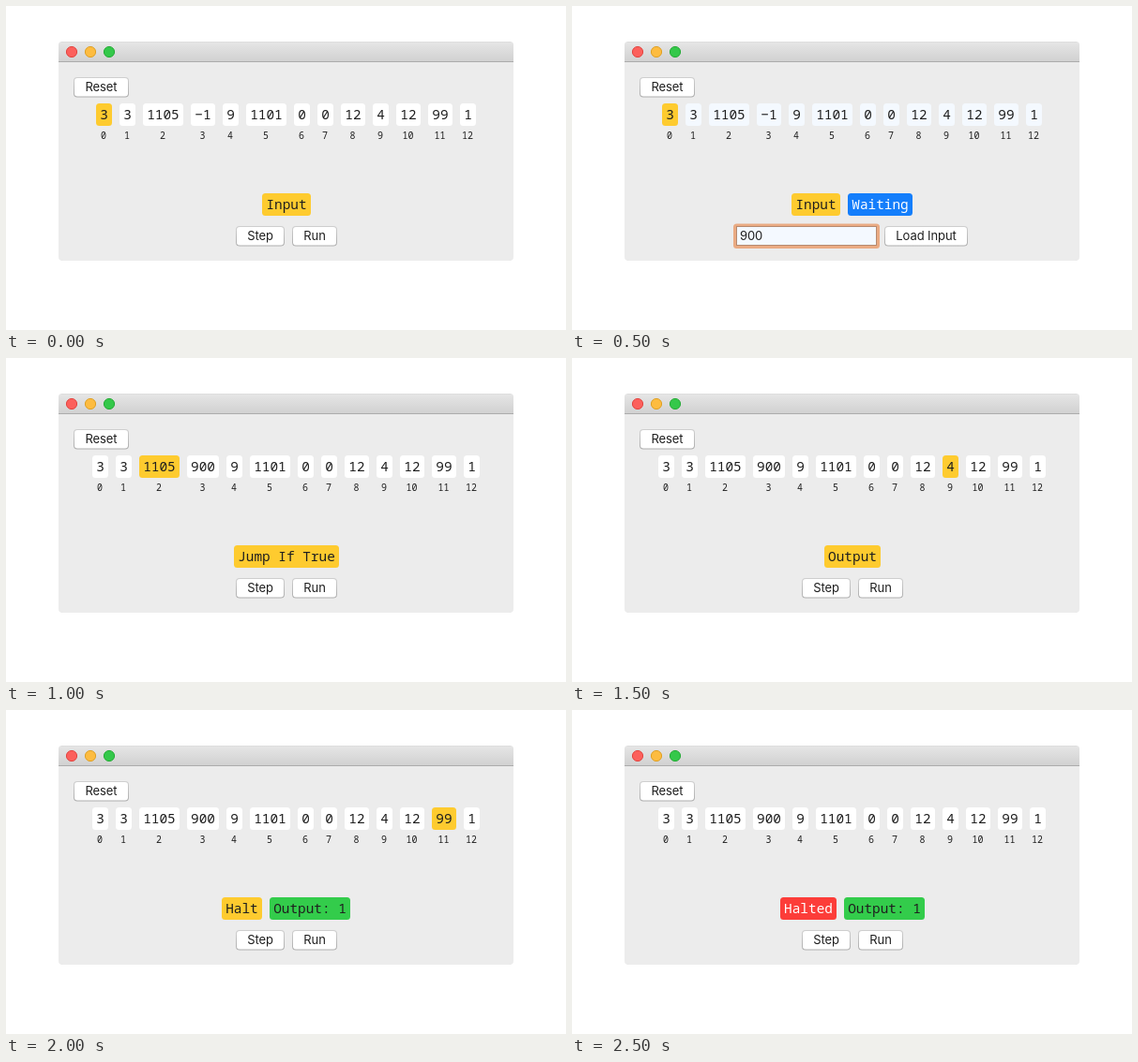
Animation of 597 by 346 pixels, one loop 3 s. Source, as an HTML page:

```html
<!DOCTYPE html>
<html lang="en">
<head>
<meta charset="utf-8">
<title>Stepping through a program</title>
<style>
  html, body { margin: 0; width: 100%; height: 100%; overflow: hidden; background: #fff; }
  svg { display: block; }
  text { fill: #1f1f1f; }
  .mono { font: 14.4px "Noto Sans Mono", "DejaVu Sans Mono", monospace; text-anchor: middle; }
  .index { font-size: 10px; }
  .ui { font: 13px Inter, "Liberation Sans", sans-serif; letter-spacing: -0.1px; }
  .mid { text-anchor: middle; }
</style>
</head>
<body>
<svg width="597" height="346" viewBox="0 0 597 346">
  <defs>
    <linearGradient id="bar" x2="0" y2="1">
      <stop stop-color="#e6e6e6"/>
      <stop offset="1" stop-color="#d0d0d0"/>
    </linearGradient>
    <linearGradient id="edge" x2="0" y2="1">
      <stop stop-color="#cfcfcf"/>
      <stop offset="1" stop-color="#adadad"/>
    </linearGradient>
  </defs>
  <path d="M56 268h4v4h-4zM537 268h4v4h-4z" fill="#8c8c8c"/>
  <path d="M55 267h3a4 4 0 0 0 3 5v1h-6zM542 267h-3a4 4 0 0 1-3 5v1h6z" fill="#fff"/>
  <rect x="56" y="38" width="485" height="234" rx="4" fill="#ececec"/>
  <path d="M56 60V42q0-4 4-4h477q4 0 4 4v18z" fill="url(#bar)"/>
  <path d="M59 38.5h479" stroke="#dedede"/>
  <path d="M56 59.5h485" stroke="#acacac"/>
  <g stroke-width="1">
    <circle cx="70" cy="49" r="5.6" fill="#fc605c" stroke="#e2443f"/>
    <circle cx="90" cy="49" r="5.6" fill="#fdbc40" stroke="#dfa023"/>
    <circle cx="110" cy="49" r="5.6" fill="#34c84a" stroke="#24ab35"/>
  </g>
  <g id="view"></g>
</svg>
<script>
const YELLOW = '#fecb2f', BLUE = '#147efb', GREEN = '#33cc4b', RED = '#fc3d39';
const GAP = 8, CENTER = 298.5, STEP_MS = 500;

const before = '3 3 1105 -1 9 1101 0 0 12 4 12 99 1'.split(' ');
const after = before.with ? before.with(3, '900') : before.map((v, i) => i === 3 ? '900' : v);

const steps = [
  { cells: before, active: 0, tags: [['Input', YELLOW]] },
  { cells: before, active: 0, tags: [['Input', YELLOW], ['Waiting', BLUE, '#fff']], input: '900' },
  { cells: after, active: 2, tags: [['Jump If True', YELLOW]] },
  { cells: after, active: 9, tags: [['Output', YELLOW]] },
  { cells: after, active: 11, tags: [['Halt', YELLOW], ['Output: 1', GREEN]] },
  { cells: after, active: -1, tags: [['Halted', RED, '#fff'], ['Output: 1', GREEN]] }
];

const chipWidth = label => Math.round(8.65 * label.length + 8.4);

// A centred row of chips: [label, background, text colour, caption]
function chipRow(chips, y) {
  const total = chips.reduce((sum, [label]) => sum + chipWidth(label) + GAP, -GAP);
  let x = Math.floor(CENTER - total / 2 + 0.5);
  return chips.map(([label, fill, color = '#1f1f1f', caption]) => {
    const w = chipWidth(label), cx = x + w / 2;
    const minus = label.replace('-', '\u2212');
    let out = `<rect x="${x}" y="${y}" width="${w}" height="24" rx="3.5" fill="${fill}"/>
      <text class="mono" x="${cx}" y="${y + 17}" style="fill:${color}">${minus}</text>`;
    if (caption !== undefined)
      out += `<text class="mono index" x="${cx - 0.5}" y="${y + 38}">${caption}</text>`;
    x += w + GAP;
    return out;
  }).join('');
}

function button(label, x, y, w) {
  return `<rect x="${x}" y="${y}" width="${w}" height="21.5" rx="4" fill="url(#edge)"/>
    <rect x="${x + 1}" y="${y + 1}" width="${w - 2}" height="19.5" rx="3.2" fill="#fff"/>
    <text class="ui mid" x="${x + w / 2}" y="${y + 15}">${label}</text>`;
}

function field(value) {
  return `<rect x="172" y="232.5" width="156" height="26.5" rx="3.5" fill="#eaab83"/>
    <rect x="175.5" y="235.5" width="149" height="20" fill="#f4f9ff" stroke="#b58a70"/>
    <text class="ui" x="179" y="250">${value}</text>`;
}

function draw({ cells, active, tags, input }) {
  const plain = input ? '#f4f9ff' : '#fff';
  const chips = cells.map((v, i) => [v, i === active ? YELLOW : plain, undefined, i]);
  const controls = input
    ? field(input) + button('Load Input', 333, 235, 89)
    : button('Step', 245, 235, 52) + button('Run', 305, 235, 48);
  return button('Reset', 72, 76, 59) + chipRow(chips, 104) + chipRow(tags, 200) + controls;
}

const view = document.getElementById('view');
let shown = -1;
function tick() {
  const now = Math.floor(performance.now() / STEP_MS) % steps.length;
  if (now !== shown) view.innerHTML = draw(steps[shown = now]);
  requestAnimationFrame(tick);
}
tick();
</script>
</body>
</html>
```
